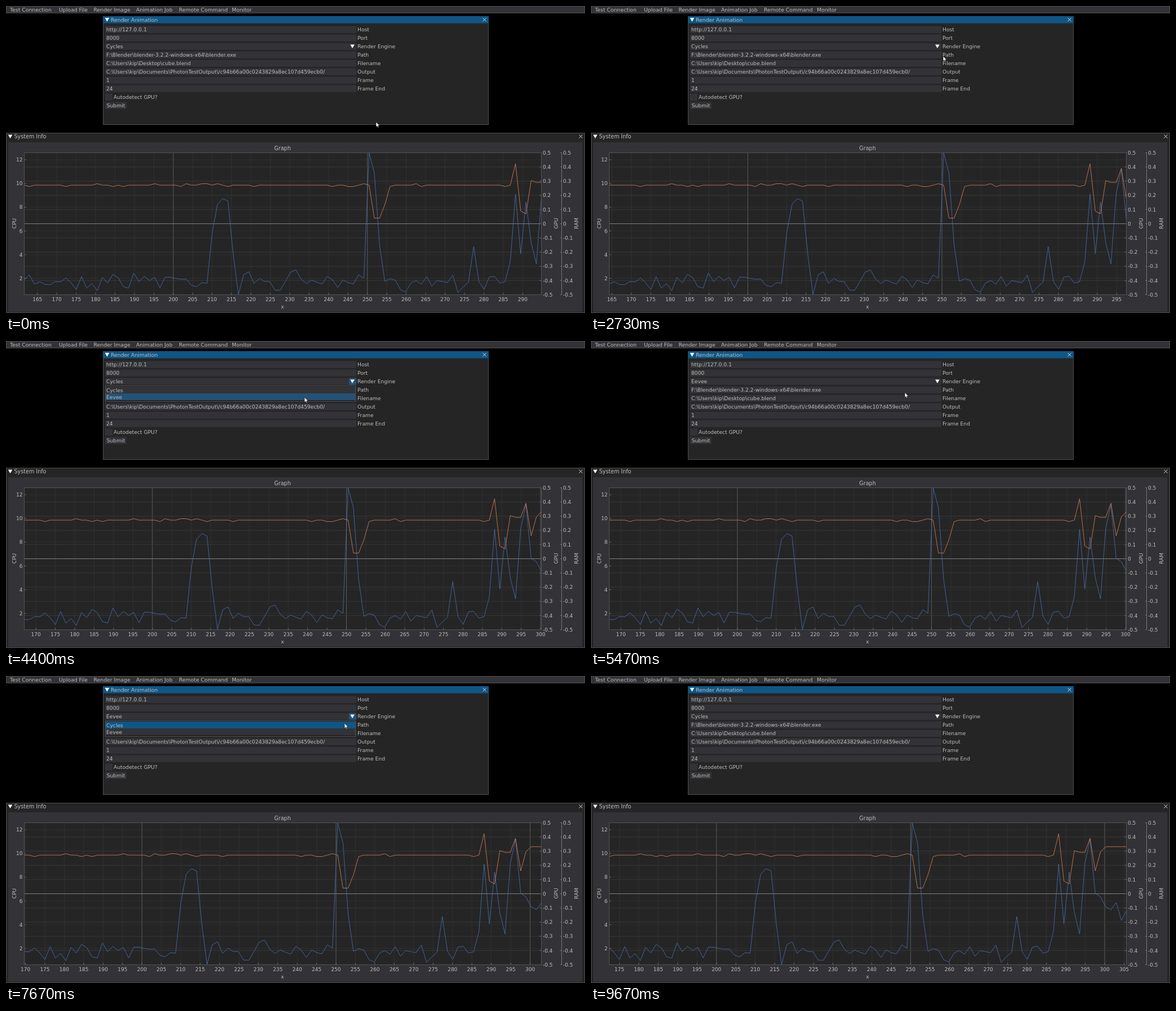
An HTML page with a canvas for the animation above (9.74 s loop, 1028 px wide and 545 px high).

```html
<!DOCTYPE html>
<html lang="en">
<head>
<meta charset="utf-8">
<title>Render Animation</title>
<style>
html, body { margin: 0; width: 100%; height: 100%; overflow: hidden; background: #000; }
canvas { display: block; }
</style>
</head>
<body>
<canvas id="stage" width="1028" height="545"></canvas>
<script>
const ctx = document.getElementById('stage').getContext('2d');
const LOOP = 9.74;
const WINDOW = '#252526', FRAME = '#333337', BORDER = '#4e4e4e';
const HOVER = '#225376', ACTIVE = '#0f5687', TEXT = '#bebebe';
const PLOT = { l: 32.5, t: 260.5, r: 950.5, b: 512.5 };
const SAMPLES = 108, SPACING = 9.283, SAMPLE_TIME = 1.345;
const ROW = 14.97, FIELD = 12.3;

let seed = 7;
const random = () => (seed = seed * 16807 % 2147483647) / 2147483647;

// A noisy idle level, interrupted by bursts that begin at a given sample
function series(idle, bursts) {
  const ys = Array.from({ length: SAMPLES }, idle);
  for (const [at, ...burst] of bursts) ys.splice(at, burst.length, ...burst);
  return ys;
}

const cpu = series(() => 467 + 21 * (random() + random()), [
  [36, 402, 352, 342, 346, 440, 512],
  [66, 261, 296, 424],
  [86, 427],
  [93, 454, 334, 440, 348, 420, 458, 333, 290, 386, 392, 410, 415, 402, 434, 416]
]);
const ram = series((_, i) => i > 102 ? 303 : 318 + 2.5 * Math.round(1.3 * (random() - .5)), [
  [67, 376.5, 376.5, 353],
  [94, 280, 364, 369, 310, 313, 313, 288, 346, 312]
]);

// Pointer keys: seconds, x, y
const path = [
  [0, 657, 206], [.5, 676, 144], [1.05, 706, 176], [1.6, 697, 203], [3.05, 615, 73],
  [3.42, 613, 72.5], [4.4, 530, 100], [5.08, 530, 100], [6.13, 617, 73],
  [6.82, 617, 73], [7.33, 601, 84], [8.22, 601, 84], [9.4, 30, 547], [LOOP, 30, 547]
];

function pointer(t) {
  const i = path.findIndex(p => p[0] > t);
  const [t0, x0, y0] = path[i - 1], [t1, x1, y1] = path[i];
  const u = (t - t0) / (t1 - t0);
  const e = u * u * (3 - 2 * u);
  return [x0 + (x1 - x0) * e, y0 + (y1 - y0) * e];
}

function box(x, y, w, h, fill, stroke) {
  ctx.fillStyle = fill;
  ctx.fillRect(x, y, w, h);
  if (stroke) {
    ctx.strokeStyle = stroke;
    ctx.lineWidth = 1;
    ctx.strokeRect(x + .5, y + .5, w - 1, h - 1);
  }
}

function text(s, x, y, size = 9, align = 'left') {
  ctx.font = size + 'px "DejaVu Sans", sans-serif';
  ctx.textAlign = align;
  ctx.fillStyle = TEXT;
  ctx.fillText(s, x, y + size * .36);
}

function sideText(s, x, y) {
  ctx.save();
  ctx.translate(x, y);
  ctx.rotate(-Math.PI / 2);
  text(s, 0, 0, 9, 'center');
  ctx.restore();
}

function line(x0, y0, x1, y1, color) {
  ctx.strokeStyle = color;
  ctx.lineWidth = 1;
  ctx.beginPath();
  ctx.moveTo(x0, y0);
  ctx.lineTo(x1, y1);
  ctx.stroke();
}

function arrow(x, y) {
  ctx.fillStyle = '#fff';
  ctx.beginPath();
  ctx.moveTo(x - 3.8, y - 3.2);
  ctx.lineTo(x + 3.8, y - 3.2);
  ctx.lineTo(x, y + 3.4);
  ctx.fill();
}

function cross(x, y) {
  line(x - 3, y - 3, x + 3, y + 3, '#ddd');
  line(x - 3, y + 3, x + 3, y - 3, '#ddd');
}

function menu() {
  box(0, 0, 1028, 13, FRAME, BORDER);
  [['Test Connection', 7], ['Upload File', 94], ['Render Image', 155.5], ['Animation Job', 231],
   ['Remote Command', 307], ['Monitor', 401]].forEach(([s, x]) => text(s, x, 7, 9.3));
}

function form(t, [mx, my]) {
  const engine = t >= 4.66 && t < 7.72 ? 'Eevee' : 'Cycles';
  const open = t >= 3.2 && t < 4.66 || t >= 6.72 && t < 7.72;
  const hover = !open && mx > 176 && mx < 622 && my > 65.5 && my < 78;
  const rowY = i => 41.8 + i * ROW;
  const field = (i, w, fill = FRAME) => box(176, rowY(i) - 6.1, w, FIELD, fill);

  box(172, 18, 685, 193, WINDOW, BORDER);
  box(172, 18, 685, 12.6, ACTIVE);
  arrow(179.5, 24.3);
  text('Render Animation', 186, 24.7, 9.3);
  cross(849.5, 24.3);

  [['http://127.0.0.1', 'Host'], ['8000', 'Port'], [engine, 'Render Engine'],
   ['F:\\Blender\\blender-3.2.2-windows-x64\\blender.exe', 'Path'],
   ['C:\\Users\\kip\\Desktop\\cube.blend', 'Filename'],
   ['C:\\Users\\kip\\Documents\\PhotonTestOutput\\/c94b66a00c0243829a8ec107d459ecb0/', 'Output'],
   ['1', 'Frame'], ['24', 'Frame End']].forEach(([value, label], i) => {
    field(i, 446, i === 2 && hover ? HOVER : FRAME);
    text(value, 178, rowY(i), 9.2);
    text(label, 624, rowY(i), 9.2);
  });
  if (open) box(609, rowY(2) - 6.1, 13, FIELD, HOVER);
  arrow(615, 71.7);

  field(8, 13);
  text('Autodetect GPU?', 191, rowY(8), 9.2);
  field(9, 38);
  text('Submit', 195, rowY(9), 9.2, 'center');

  if (open) {
    box(176, 79, 445, 29, WINDOW, BORDER);
    ['Cycles', 'Eevee'].forEach((name, i) => {
      const top = 81 + i * 12;
      const over = mx > 176 && mx < 621 && my >= top && my < top + 12;
      const fill = over ? (t >= 7.66 ? ACTIVE : HOVER) : name === engine ? FRAME : WINDOW;
      box(177, top, 443, 12, fill);
      text(name, 178, top + 6.2, 9.2);
    });
  }
}

function trace(ys, shift, color) {
  ctx.strokeStyle = color;
  ctx.lineWidth = .8;
  ctx.beginPath();
  ys.forEach((y, i) => ctx.lineTo(32 + (i - shift) * SPACING, y));
  ctx.stroke();
}

function graph(t) {
  const shift = Math.floor((t - .24) / SAMPLE_TIME) + 1;
  const { l, t: top, r, b } = PLOT;

  box(0, 225, 1028, 320, WINDOW, BORDER);
  arrow(7.5, 231.7);
  text('System Info', 14.5, 232, 9.6);
  cross(1020.5, 231.5);
  box(4, 242, 1019, 301, FRAME);
  text('Graph', 491, 253, 9.6, 'center');
  text('x', 491, 533.5, 9, 'center');
  sideText('CPU', 15, 386);
  sideText('GPU', 977, 386);
  sideText('RAM', 1013, 386);
  box(l, top, r - l, b - top, WINDOW);

  for (let v = 2; v <= 12; v += 2) {
    const y = 525.6 - 21.05 * v;
    line(l, y, r, y, '#2e2e2f');
    line(l, y, l + 3, y, '#777');
    text(v, 29.5, y, 9, 'right');
  }
  for (let v = 160; v <= 310; v += 5) {
    const x = 297 + (v - 200) * 6.893 - shift * SPACING;
    if (x < 32 || x > 951) continue;
    line(x, top, x, b, v % 50 ? '#313132' : '#5c5c5c');
    line(x, b, x, b - 3, '#777');
    text(v, x, 521, 9, 'center');
  }
  for (let i = -5; i <= 5; i++) {
    const y = 386.5 - i * 25.2;
    line(l, y, r, y, i ? '#383839' : '#808080');
    line(r, y, r - 3, y, '#777');
    line(984, y, 987, y, '#777');
    const label = i ? (i / 10).toFixed(1) : '0';
    text(label, 953, y, 9);
    text(label, 989, y, 9);
  }
  line(986.5, top, 986.5, b, '#777');

  ctx.save();
  ctx.beginPath();
  ctx.rect(l, top, r - l, b - top);
  ctx.clip();
  trace(cpu, shift, 'rgb(76,114,176)');
  trace(ram, shift, 'rgb(221,132,82)');
  ctx.restore();
  ctx.strokeStyle = '#535357';
  ctx.lineWidth = 1;
  ctx.strokeRect(l, top, r - l, b - top);
}

function cursor([x, y]) {
  ctx.save();
  ctx.translate(x, y);
  ctx.beginPath();
  [[0, 0], [0, 8.6], [2, 6.9], [3.3, 9.8], [4.7, 9.2], [3.4, 6.3], [6.2, 6.2]]
    .forEach(p => ctx.lineTo(...p));
  ctx.closePath();
  ctx.fillStyle = '#fff';
  ctx.fill();
  ctx.strokeStyle = '#000';
  ctx.lineWidth = .5;
  ctx.stroke();
  ctx.restore();
}

function draw(now) {
  const t = now / 1000 % LOOP;
  const at = pointer(t);
  box(0, 0, 1028, 545, '#000');
  menu();
  form(t, at);
  graph(t);
  cursor(at);
}

const start = performance.now();
function tick(now) {
  draw(Math.max(0, now - start));
  requestAnimationFrame(tick);
}
draw(0);
requestAnimationFrame(tick);
</script>
</body>
</html>
```
